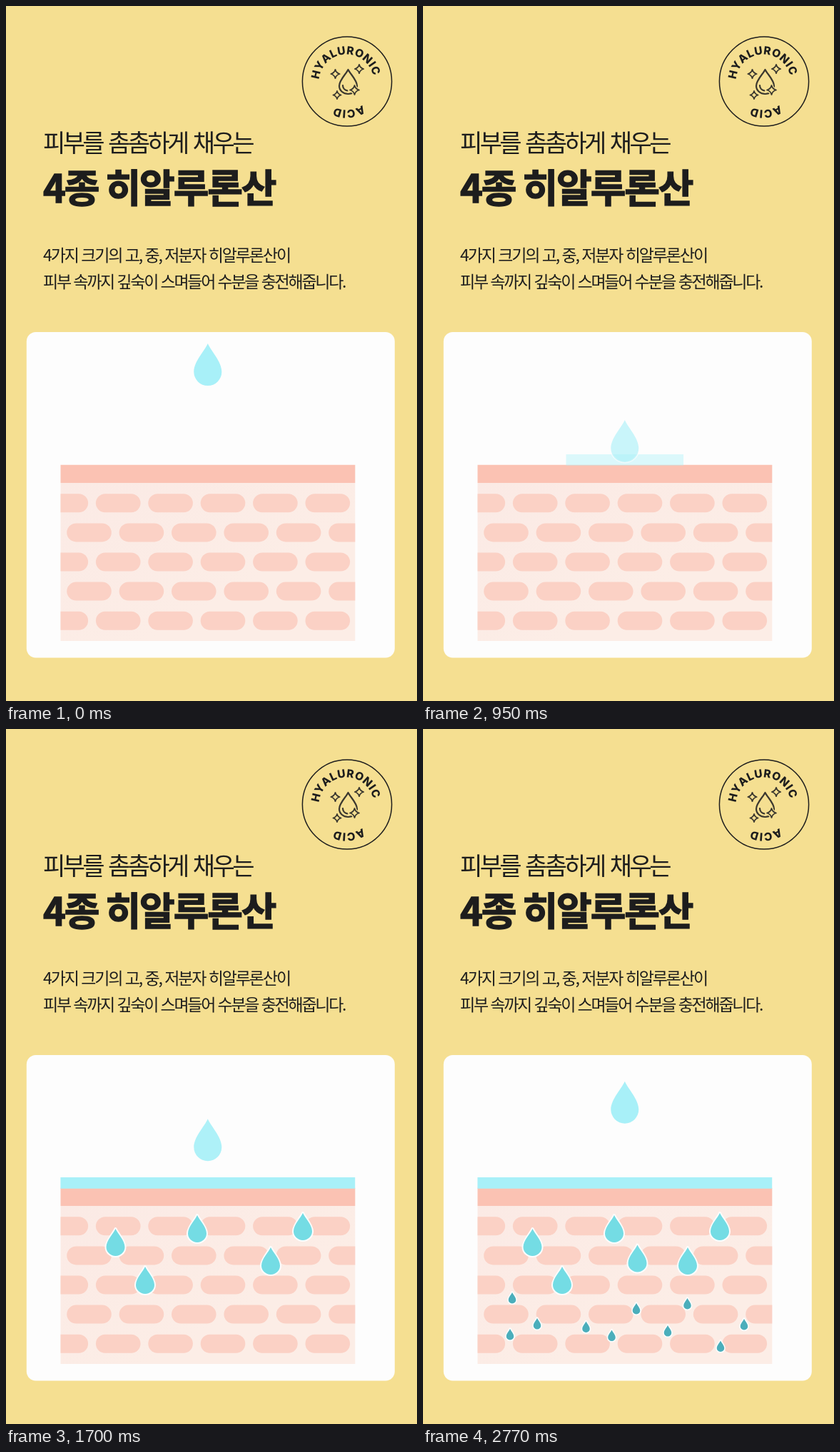
An HTML page with a canvas that plays this animation: 576 px wide and 972 px high, repeating every 2840 ms.

```html
<!DOCTYPE html>
<html lang="ko">
<head>
<meta charset="utf-8">
<style>
  html, body { margin: 0; width: 100%; height: 100%; overflow: hidden; background: #f5df91; }
  canvas { display: block; }
</style>
</head>
<body>
<canvas id="stage" width="576" height="972"></canvas>
<script>
const ctx = document.getElementById('stage').getContext('2d');
const LOOP = 2840;
const YELLOW = '#f5df91', INK = '#1d1d1d', AQUA = '#a8f0f8';
const KOREAN = '"Noto Sans CJK KR", "Noto Sans CJK", sans-serif';
const clamp = v => Math.max(0, Math.min(1, v));

// Falling drops: motion start, visible from, fade from, gone at
const falls = [
  { start: -45, show: 0, fade: 800, end: 1180 },
  { start: 1122, show: 1250, fade: 1685, end: 1900 },
  { start: 1778, show: 1950, fade: 2340, end: 2560 },
  { start: 2498, show: 2600, fade: 3000, end: 3200 }
];

// Drops inside the skin: centre x, top, appearance time
const bigDrops = [
  [268, 680, 1350], [153.5, 699, 1400], [416, 677, 1450],
  [195, 752, 1500], [371, 725, 1550], [300.5, 721.5, 1750]
];
const smallDrops = [
  [125, 788, 1800], [299, 803, 1850], [160, 824, 1900], [450, 825, 1950],
  [122, 839, 2200], [370.5, 796, 2350], [228.5, 828.5, 2400],
  [343, 834, 2500], [264.5, 840.5, 2550], [417, 855.5, 2600]
];

function rect(x, y, w, h, color, radius = 0) {
  ctx.fillStyle = color;
  ctx.beginPath();
  ctx.roundRect(x, y, w, h, radius);
  ctx.fill();
}

function dropPath(x, top, w, h) {
  const r = w / 2, mid = top + h * 0.67;
  ctx.beginPath();
  ctx.moveTo(x, top);
  ctx.bezierCurveTo(x + w * 0.11, top + h * 0.17, x + r, top + h * 0.43, x + r, mid);
  ctx.ellipse(x, mid, r, h * 0.33, 0, 0, Math.PI);
  ctx.bezierCurveTo(x - r, top + h * 0.43, x - w * 0.11, top + h * 0.17, x, top);
  ctx.closePath();
}

function drop(x, top, w, h, color, outline, alpha) {
  if (alpha <= 0) return;
  ctx.globalAlpha = alpha;
  dropPath(x, top, w, h);
  ctx.strokeStyle = '#fdfdfd';
  ctx.lineWidth = outline * 2;
  ctx.lineJoin = 'round';
  ctx.stroke();
  ctx.fillStyle = color;
  ctx.fill();
  ctx.globalAlpha = 1;
}

function label(text, y, size, weight, spacing, wordSpacing, extraWeight = 0) {
  ctx.font = `${weight} ${size}px ${KOREAN}`;
  ctx.letterSpacing = spacing + 'px';
  ctx.wordSpacing = wordSpacing + 'px';
  ctx.textAlign = 'left';
  ctx.textBaseline = 'alphabetic';
  ctx.fillStyle = ctx.strokeStyle = INK;
  ctx.fillText(text, 52, y);
  if (extraWeight) {
    ctx.lineWidth = extraWeight;
    ctx.lineJoin = 'miter';
    ctx.strokeText(text, 52, y);
  }
  ctx.letterSpacing = ctx.wordSpacing = '0px';
}

function arcText(text, x, y, radius, centre, gap) {
  ctx.font = '800 15.5px Inter, sans-serif';
  ctx.textAlign = 'center';
  ctx.textBaseline = 'alphabetic';
  ctx.fillStyle = INK;
  const widths = [...text].map(c => ctx.measureText(c).width + gap);
  let along = -widths.reduce((a, b) => a + b) / 2;
  [...text].forEach((c, i) => {
    const angle = centre + (along + widths[i] / 2) / radius;
    along += widths[i];
    ctx.save();
    ctx.translate(x, y);
    ctx.rotate(angle + Math.PI / 2);
    ctx.fillText(c, 0, 5.6 - radius);
    ctx.restore();
  });
}

function sparkle(x, y, r) {
  ctx.beginPath();
  ctx.moveTo(x, y - r);
  for (let i = 1; i <= 4; i++) {
    const a = i * Math.PI / 2 - Math.PI / 2, m = a - Math.PI / 4;
    ctx.quadraticCurveTo(x + Math.cos(m) * r * 0.28, y + Math.sin(m) * r * 0.28,
      x + Math.cos(a) * r, y + Math.sin(a) * r);
  }
  ctx.closePath();
  ctx.fillStyle = ctx.strokeStyle = YELLOW;
  ctx.lineWidth = 4.5;
  ctx.stroke();
  ctx.fill();
  ctx.strokeStyle = '#3b382f';
  ctx.lineWidth = 1.8;
  ctx.stroke();
}

function badge() {
  ctx.strokeStyle = INK;
  ctx.lineWidth = 1.5;
  ctx.beginPath();
  ctx.arc(478, 105.5, 62.6, 0, Math.PI * 2);
  ctx.stroke();
  arcText('HYALURONIC', 477, 106, 44, 266 * Math.PI / 180, 2);
  arcText('ACID', 477, 106, 45, 85 * Math.PI / 180, 2);

  ctx.lineJoin = ctx.lineCap = 'round';
  ctx.strokeStyle = '#3b382f';
  ctx.lineWidth = 2.2;
  dropPath(479.5, 89, 25, 34);
  ctx.stroke();
  ctx.beginPath();
  ctx.arc(479.5, 111, 7.5, Math.PI * 0.55, Math.PI);
  ctx.stroke();
  sparkle(461.5, 95, 6.2);
  sparkle(495, 88, 6.2);
  sparkle(488.5, 117.5, 6.5);
  sparkle(464, 124.5, 5.6);
}

function skin() {
  const tone = ctx.createLinearGradient(76, 667, 200, 888);
  tone.addColorStop(0, '#fbeae5');
  tone.addColorStop(1, '#fcede6');
  rect(76.5, 667, 412.8, 221, tone);
  ctx.save();
  ctx.beginPath();
  ctx.rect(76.5, 667, 412.8, 221);
  ctx.clip();
  for (let row = 0; row < 5; row++) {
    const first = row % 2 ? 85.2 : 52.5;
    for (let col = 0; col < 6; col++) {
      rect(first + col * 73.4, 682.3 + row * 41.1, 62.6, 26, '#fbd1c5', 13);
    }
  }
  ctx.restore();
  rect(76.5, 641.8, 412.8, 25.2, '#fbc2b3');
}

function waterLayer(t) {
  const p = clamp((t - 783) / 419);
  if (!p) return;
  ctx.globalAlpha = p;
  rect(282.8 - 206.4 * p, 627, 412.8 * p, 15.8, AQUA);
  ctx.globalAlpha = 1;
}

function fallingDrop(t, f) {
  if (t < f.show || t >= f.end) return;
  const u = clamp((t - f.start) / 930);
  const top = 471.5 + 107.5 * (1 - Math.cos(Math.PI * u)) / 2;
  drop(282.8, top, 39, 59, AQUA, 1.5, 1 - clamp((t - f.fade) / (f.end - f.fade)));
}

// The picture advances in 50 ms steps with a few longer holds
function stepTime(t) {
  if (t < 100) return 0;
  if (t >= 2770) return 2770;
  if (t >= 2700) return 2700;
  if (t >= 1200 && t < 1250) return 1150;
  return Math.floor(t / 50) * 50;
}

function draw(t) {
  rect(0, 0, 576, 972, YELLOW);
  badge();
  label('피부를 촘촘하게 채우는', 204, 34, 300, -3.6, 4);
  label('4종 히알루론산', 274.5, 54, 900, -2.1, 0, 1.4);
  label('4가지 크기의 고, 중, 저분자 히알루론산이', 357, 23, 300, -2.1, 1.3);
  label('피부 속까지 깊숙이 스며들어 수분을 충전해줍니다.', 393.5, 23, 300, -2.25, 1.5);

  rect(28.8, 456, 516, 455.5, '#fdfdfd', 13);
  skin();
  waterLayer(t);
  falls.forEach(f => fallingDrop(t, f));
  const appear = at => clamp((t - at + 50) / 100);
  bigDrops.forEach(([x, y, at]) => drop(x, y, 26, 38, '#74dce4', 2, appear(at)));
  smallDrops.forEach(([x, y, at]) => drop(x, y, 10.5, 15.5, '#4baebb', 1.6, appear(at)));
}

const began = performance.now();
function frame() {
  draw(stepTime((performance.now() - began) % LOOP));
  requestAnimationFrame(frame);
}
frame();
</script>
</body>
</html>
```
